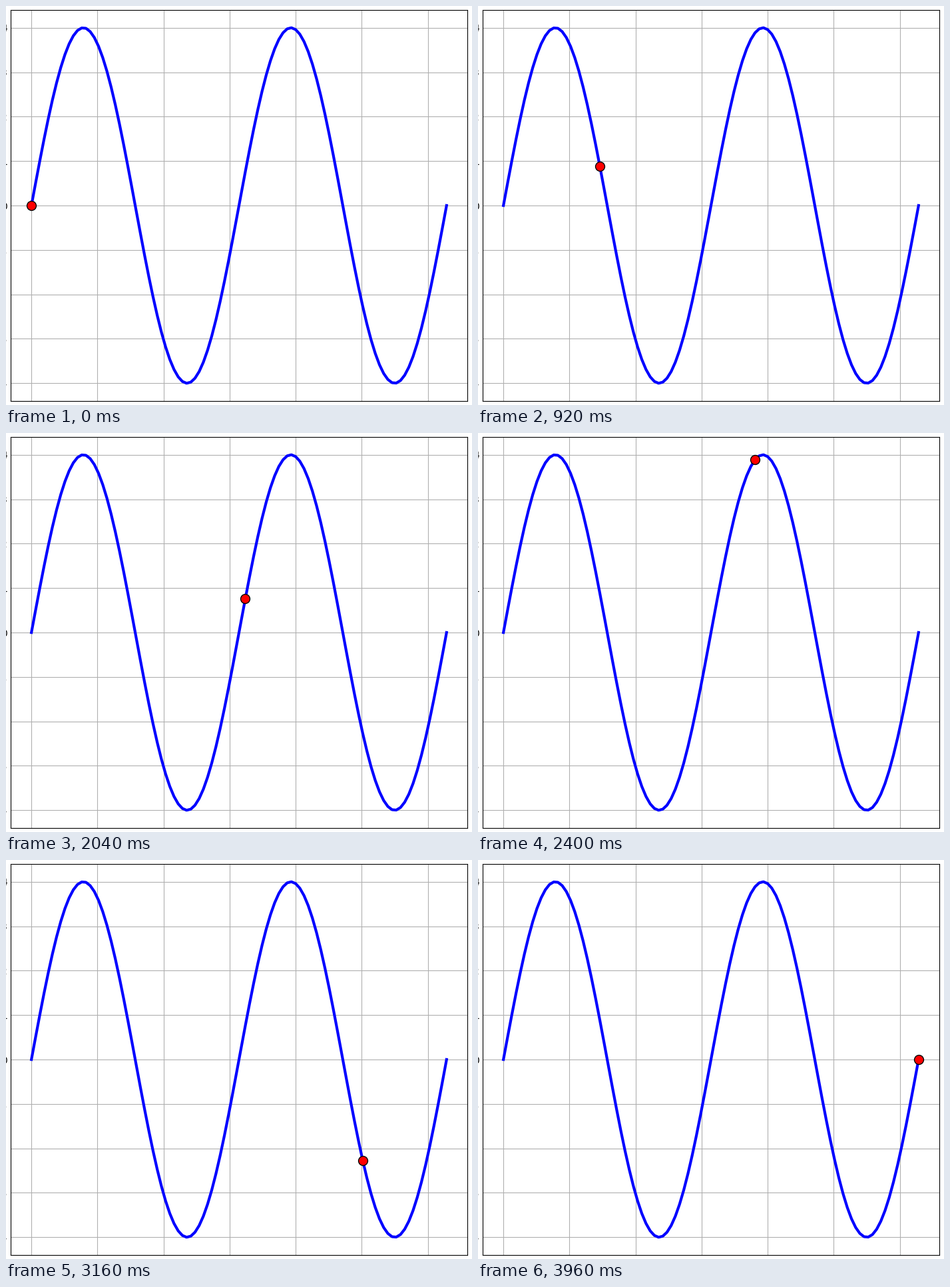
Animation of 700x600 px, one loop 4000 ms. Source, as a matplotlib script:

```python
import matplotlib.pyplot as plt
import numpy as np
from matplotlib.animation import FuncAnimation

FRAMES = 100
INTERVAL = 40

x = np.linspace(0, 4 * np.pi, FRAMES)
y = 4 * np.sin(x)

fig, ax = plt.subplots(figsize=(7, 6), dpi=100)
fig.subplots_adjust(left=0.01, right=0.99, bottom=0.01, top=0.99)
ax.plot(x, y, color="blue", linewidth=3)
dot, = ax.plot(x[:1], y[:1], "o", markersize=10,
               markerfacecolor="red", markeredgecolor="black")
ax.grid(True)
ax.tick_params(length=0)


def update(i):
    dot.set_data([x[i]], [y[i]])
    return dot,


anim = FuncAnimation(fig, update, frames=FRAMES, interval=INTERVAL,
                     repeat=True, repeat_delay=0)
plt.show()
```
